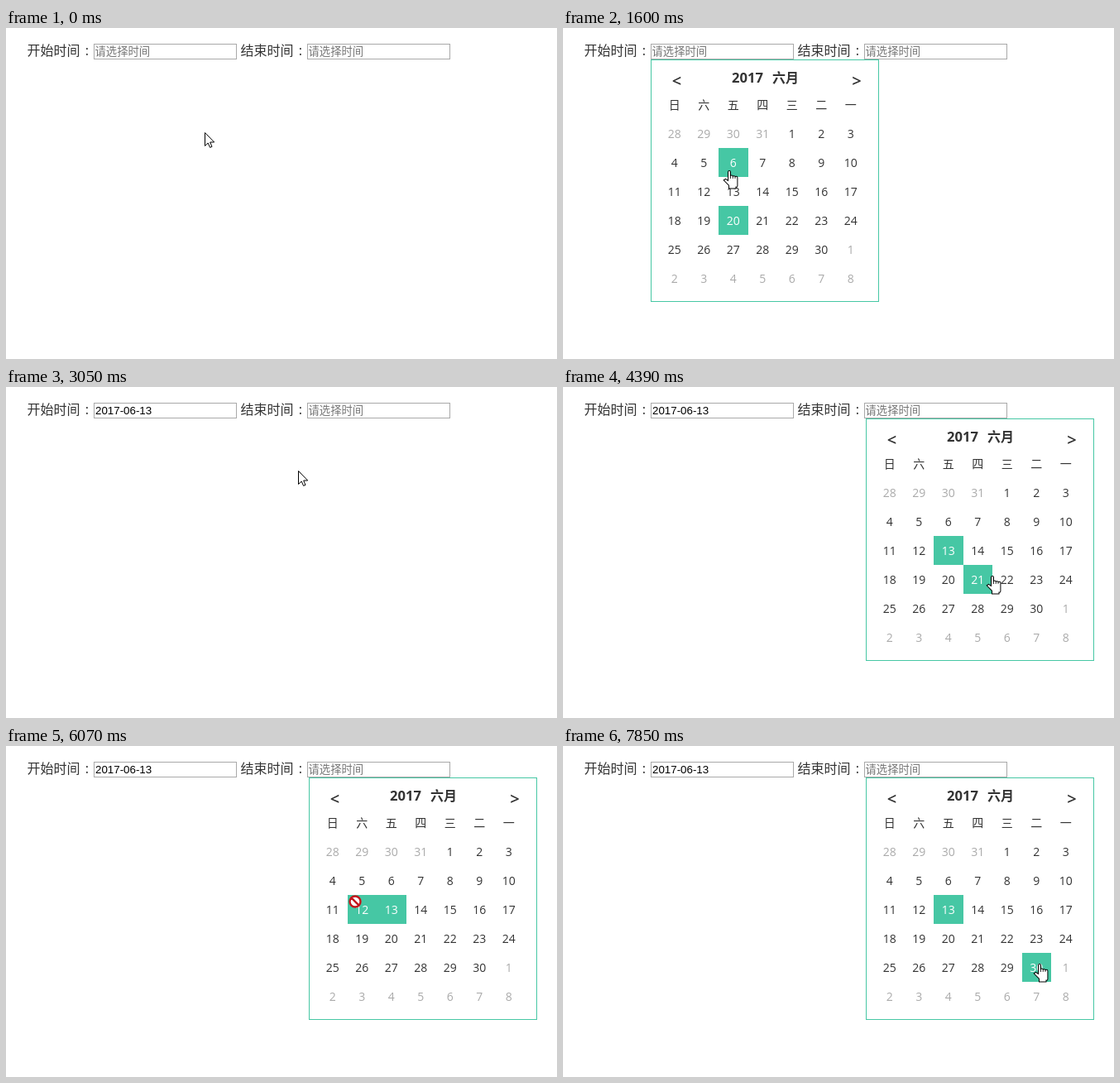
An HTML page with a canvas that plays this animation: 666x400 px, repeating every 8 s.

```html
<!DOCTYPE html>
<html lang="zh-CN">
<head>
<meta charset="utf-8">
<title>Date range picker</title>
<style>
html, body { margin: 0; width: 100%; height: 100%; overflow: hidden; background: #fff; }
canvas { display: block; }
</style>
</head>
<body>
<canvas id="stage" width="666" height="400"></canvas>
<script>
const ctx = document.getElementById('stage').getContext('2d');
const LOOP = 8000, STEP = 77, GREEN = '#46c7a4', INK = '#333';
const CJK = '"Noto Sans CJK SC", sans-serif';
const LATIN = '"Open Sans", sans-serif';
const ARIAL = '"Liberation Sans", Arial, sans-serif';
const COL = 35.5, ROW = 35, GRID_TOP = 110;
const OPEN_START = 970, PICK_START = 2740, OPEN_END = 3820;
const START_X = 106, END_X = 364, END_CALENDAR_X = 366, FIELD_W = 173;

// Pointer glides: start, end, then points evenly spaced in time.
const glides = [
  [70, 570, [165, 56], [143, 34]],
  [1440, 2360, [205, 184], [236, 256], [230, 206], [210, 208]],
  [PICK_START, 3520, [367, 90], [418, 37]],
  [4220, 4990, [540, 270], [572, 276], [583, 261]],
  [5300, 6460, [500, 225], [421, 189], [430, 166]],
  [7070, 7850, [505, 215], [598, 282], [575, 263]]
];

function pointerAt(t) {
  let x = 240, y = 126;
  for (const [start, end, ...points] of glides) {
    if (t < start) break;
    const steps = Math.round((end - start) / STEP) + 1;
    const progress = (Math.floor((t - start) / STEP) + 1) / steps * points.length;
    points.forEach(([px, py], i) => {
      const part = Math.max(0, Math.min(1, progress - i));
      x += (px - x) * part;
      y += (py - y) * part;
    });
  }
  return { x: Math.round(x), y: Math.round(y) };
}

function text(str, x, y, font, color = INK, align = 'left') {
  ctx.font = font;
  ctx.fillStyle = color;
  ctx.textAlign = align;
  ctx.fillText(str, x, y);
}

function frame(x, y, w, h, color) {
  ctx.strokeStyle = color;
  ctx.lineWidth = 1;
  ctx.strokeRect(x + .5, y + .5, w - 1, h - 1);
}

function field(label, x, value) {
  text(label, x - 80.5, 33, '350 16px ' + CJK);
  text(':', x - 8, 33, '16px ' + LATIN, INK, 'center');
  frame(x, 19, FIELD_W, 19, '#a9a9a9');
  if (value) text(value, x + 2, 33, '13.333px ' + ARIAL, '#000');
  else text('请选择时间', x + 1.5, 33, '350 13.333px ' + CJK, '#757575');
}

function calendar(x, selected, hover) {
  const left = c => x + 11 + COL * c;
  ctx.fillStyle = '#fff';
  ctx.fillRect(x, 38, 276, 293);
  frame(x, 38, 276, 293, GREEN);
  text('2017', x + 98, 66, 'bold 16.6px ' + LATIN);
  text('六月', x + 147, 66, 'bold 16px ' + CJK);
  text('<', x + 31.5, 71, '600 20px ' + LATIN, INK, 'center');
  text('>', x + 249, 71, '600 20px ' + LATIN, INK, 'center');
  [...'日六五四三二一'].forEach((d, c) => text(d, left(c + .5), 98, '350 14px ' + CJK, INK, 'center'));

  for (let i = 0; i < 42; i++) {
    const c = i % 7, top = GRID_TOP + Math.floor(i / 7) * ROW;
    const date = new Date(2017, 4, 28 + i);
    const active = i === selected || i === hover;
    if (active) {
      const l = Math.round(left(c));
      ctx.fillStyle = GREEN;
      ctx.fillRect(l, top, Math.round(left(c + 1)) - l, ROW);
    }
    const color = active ? '#fff' : date.getMonth() === 5 ? INK : '#aaa';
    text(date.getDate(), left(c + .5), top + 23, '14px ' + LATIN, color, 'center');
  }
}

function cellAt(p, x) {
  const c = Math.floor((p.x - x - 11) / COL), r = Math.floor((p.y - GRID_TOP) / ROW);
  return c >= 0 && c < 7 && r >= 0 && r < 6 ? r * 7 + c : -1;
}

const arrow = new Path2D('M.5 .5V16.5L4.2 13L6.6 18.4L9 17.4L6.7 12H11.7Z');

// Four fingers, the palm, the cuff and a slanted thumb.
const hand = new Path2D();
for (let i = 0; i < 4; i++) hand.roundRect(2 * i * 1.4 + 1, i ? 6 + i * .6 : 1, 2, 12, 1);
hand.roundRect(1, 10, 10.4, 8, 2);
hand.rect(2, 16, 7.5, 5.5);
hand.moveTo(2, 18);
hand.lineTo(-4, 12);
hand.lineTo(-2.5, 11);
hand.lineTo(2, 14);

function stroke(path, color, width) {
  ctx.strokeStyle = color;
  ctx.lineWidth = width;
  ctx.stroke(path);
}

const cursors = {
  arrow() {
    ctx.fillStyle = '#fff';
    ctx.fill(arrow);
    stroke(arrow, '#000', 1);
  },
  hand() {
    ctx.translate(-1, 0);
    stroke(hand, '#000', 2);
    ctx.fillStyle = '#fff';
    ctx.fill(hand);
  },
  beam() {
    stroke(new Path2D('M-2.5 -7.5H3.5M.5 -7.5V7.5M-2.5 7.5H3.5'), '#000', 1);
  },
  blocked() {
    const ring = new Path2D('M-4.6 -4.6L4.6 4.6');
    ring.arc(0, 0, 6.5, Math.PI / 4, Math.PI * 9 / 4);
    ctx.fillStyle = '#fff';
    ctx.fill(ring);
    stroke(ring, '#c4161c', 2.4);
  }
};

function draw(t) {
  const p = pointerAt(t);
  const first = t >= OPEN_START && t < PICK_START, second = t >= OPEN_END;
  const hover = first ? cellAt(p, START_X) : second ? cellAt(p, END_CALENDAR_X) : -1;
  ctx.fillStyle = '#fff';
  ctx.fillRect(0, 0, 666, 400);
  field('开始时间', START_X, t >= PICK_START && '2017-06-13');
  field('结束时间', END_X);
  if (first) calendar(START_X, 23, hover);
  if (second) calendar(END_CALENDAR_X, 16, hover);

  const overField = p.y >= 19 && p.y < 38 && [START_X, END_X].some(x => p.x >= x && p.x < x + FIELD_W);
  const kind = hover >= 0 ? (second && hover < 16 ? 'blocked' : 'hand') : overField ? 'beam' : 'arrow';
  ctx.save();
  ctx.translate(p.x, p.y);
  cursors[kind]();
  ctx.restore();
}

const begin = performance.now();
function tick() {
  draw((performance.now() - begin) % LOOP);
  requestAnimationFrame(tick);
}
tick();
</script>
</body>
</html>
```
